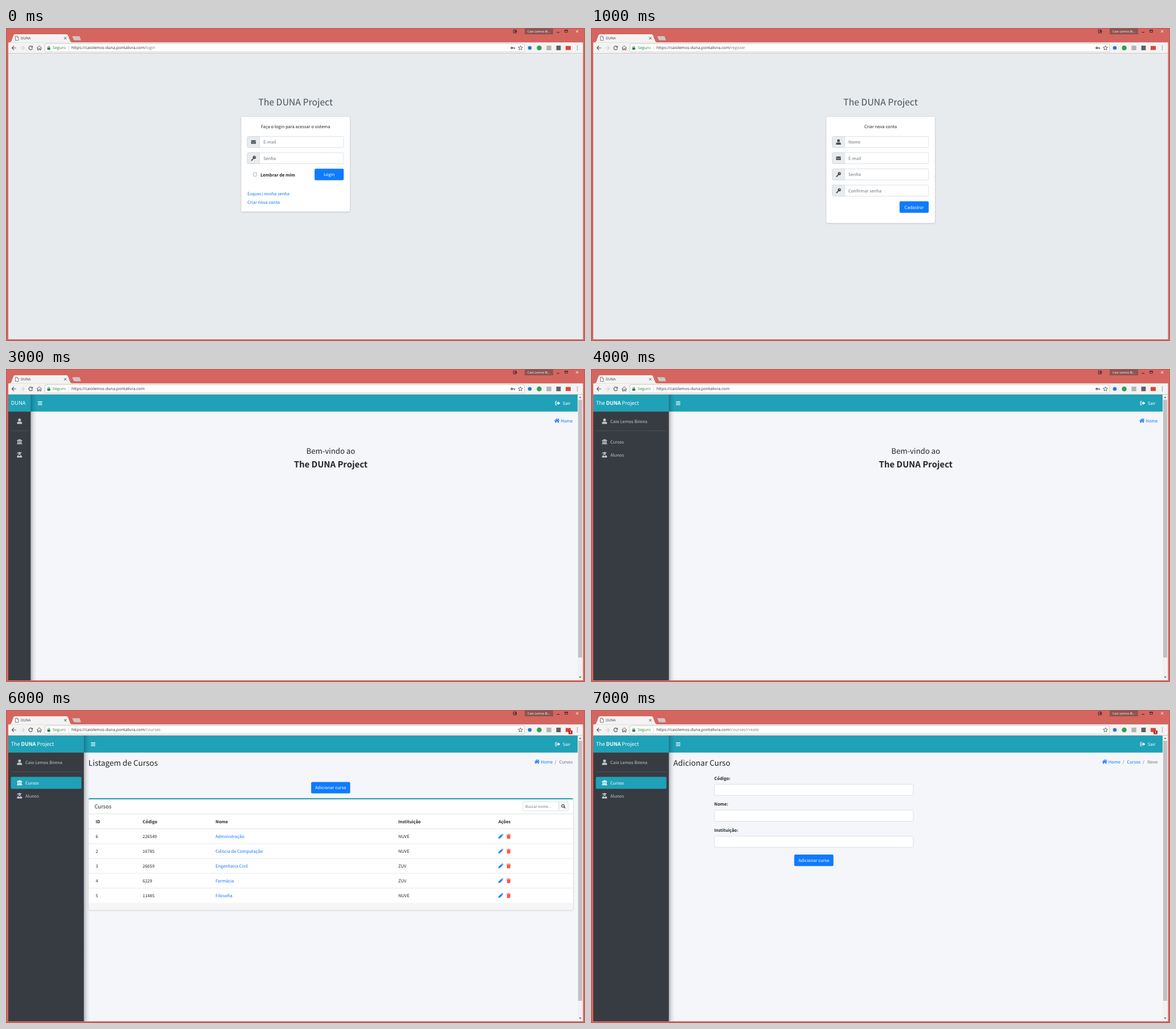
Animation, 1017 px wide and 550 px high, one loop 8000 ms. Source, as an HTML page:

```html
<!DOCTYPE html>
<html lang="pt-BR">
<head>
<meta charset="utf-8">
<title>DUNA</title>
<style>
  html, body { margin: 0; width: 100%; height: 100%; overflow: hidden; }
  svg { display: block; width: 100%; height: 100%; }
  text {
    font-family: "Noto Sans CJK JP", "Noto Sans CJK SC", "Noto Sans CJK KR", "Noto Sans CJK TC", "Noto Sans CJK", sans-serif;
    text-rendering: geometricPrecision;
    white-space: pre;
  }
  .ui text { font-family: "Open Sans", "Noto Sans", sans-serif; }
</style>
</head>
<body>
<svg id="stage" viewBox="0 0 1017 550" xmlns="http://www.w3.org/2000/svg"></svg>
<script>
const TEAL = '#1fa1b7', DARK = '#373c42', BLUE = '#0f7bff', INK = '#212529',
      GREY = '#6c757d', LINE = '#dee2e6', EDGE = '#ced4da', NAV = '#c2c7d0';
const BODY = 7.52;
const HOST = 'https://caiolemos-duna.pontalivra.com';
const USER = 'Caio Lemos Birena';

// Drawing helpers
const rect = (x, y, w, h, fill, more = '') =>
  `<rect x="${x}" y="${y}" width="${w}" height="${h}" fill="${fill}" ${more}/>`;
const path = (d, fill, more = '') => `<path d="${d}" fill="${fill}" ${more}/>`;
const line = (d, color, w = 1) =>
  path(d, 'none', `stroke="${color}" stroke-width="${w}"`);
const circle = (x, y, r, fill, more = '') =>
  `<circle cx="${x}" cy="${y}" r="${r}" fill="${fill}" ${more}/>`;
const at = (x, y, body) => `<g transform="translate(${x} ${y})">${body}</g>`;
const text = (x, y, s, { size = BODY, fill = INK, weight = 400, anchor = 'start' } = {}) =>
  `<text x="${x}" y="${y}" font-size="${size}" fill="${fill}" font-weight="${weight}" text-anchor="${anchor}">${s}</text>`;
const brand = (x, y, size, fill, weight, anchor) =>
  text(x, y, `The <tspan font-weight="${weight}">DUNA</tspan> Project`, { size, fill, weight: 300, anchor });

// Icons, centred on 0,0
const icon = {
  user: c => circle(0, -2.3, 2.5, c) +
    path('M-4.4 4.8V3.4C-4.4 1.6-3.2.7-1.6.7Q0 1.6 1.6.7C3.2.7 4.4 1.6 4.4 3.4V4.8Z', c),
  bank: c => path('M-4.7-2.3 0-4.5 4.7-2.3V-1.3H-4.7Z', c) +
    [-3.4, -.8, 1.8].map(x => rect(x, -.8, 1.6, 3.4, c)).join('') +
    rect(-4, 2.4, 8, .9, c) + rect(-4.7, 3.6, 9.4, 1, c),
  student: c => path('M-4.6-3.6 0-4.9 4.6-3.6 0-2.3Z', c) + line('M-3.9-3.4V-.6', c, .6) +
    path('M-2.4-2.7Q0-1.5 2.4-2.7C2.8 1.2-2.8 1.2-2.4-2.7Z', c) +
    path('M-4.4 4.8V3.2C-4.4 1.7-3.2.9-1.9.8L0 2.7 1.9.8C3.2.9 4.4 1.7 4.4 3.2V4.8Z', c),
  mail: c => rect(-4.2, -3.1, 8.4, 6.3, c, 'rx=".8"') +
    line('M-4.2-1.3 0 1.2 4.2-1.3', '#e9ecef', .7),
  key: c => circle(1.6, -1.5, 2.8, c) + circle(2.3, -2.2, .8, '#e9ecef') +
    path('M.1-.9-4.2 3.2V4.4H-2V3.2H-.8V2L1.5.6Z', c),
  home: c => path('M-4.7.1 0-3.9 4.7.1 4.1.8 0-2.6-4.1.8Z', c) + rect(2.2, -3.6, 1.2, 2.4, c) +
    path('M-3.2.9 0-1.8 3.2.9V3.7H.9V1.3H-.9V3.7H-3.2Z', c),
  exit: c => line('M-1-3H-3.2Q-3.8-3-3.8-2.4V2.4Q-3.8 3-3.2 3H-1', c, 1.1) +
    path('M-2-1H.7V-3.2L4.4 0 .7 3.2V1H-2Z', c),
  bars: c => [-3.1, -.5, 2.1].map(y => rect(-3.8, y, 7.6, 1.2, c)).join(''),
  search: c => circle(-.7, -.7, 2.3, 'none', `stroke="${c}" stroke-width="1.1"`) +
    line('M1 1 3.4 3.4', c, 1.3),
  pencil: c => path('M-4.2 4.2-3.6 1.4 1.1-3.3 3.3-1.1-1.4 3.6Z', c) +
    path('M1.6-3.8 2.3-4.3Q2.8-4.6 3.3-4.1L4.1-3.3Q4.5-2.8 4.2-2.3L3.8-1.6Z', c),
  trash: c => path('M-3.7-3.6H-1.3L-.9-4.2H.9L1.3-3.6H3.7V-2.6H-3.7Z', c) +
    path('M-3.2-2.1H3.2L2.8 3.6Q2.7 4.2 2.2 4.2H-2.2Q-2.7 4.2-2.8 3.6Z', c)
};

// Controls
const button = (x, y, w, label) => rect(x, y, w, 20.2, BLUE, 'rx="2"') +
  text(x + w / 2, y + 13, label, { fill: '#fff', anchor: 'middle' });
const input = (x, y, w, h = 19.5) => rect(x, y, w, h, '#fff', `rx="2" stroke="${EDGE}" stroke-width=".7"`);
const field = (y, glyph, label) => input(424, y, 169) +
  path(`M445.5 ${y}H426Q424 ${y} 424 ${y + 2}V${y + 17.5}Q424 ${y + 19.5} 426 ${y + 19.5}H445.5Z`,
    '#e9ecef', `stroke="${EDGE}" stroke-width=".7"`) +
  at(434.7, y + 9.8, icon[glyph]('#495057')) + text(452, y + 12.6, label, { fill: GREY });

function windowFrame() {
  const dark = '#5a5a5a';
  return rect(0, 0, 1017, 550, '#d5655f') +
    rect(.5, .5, 1016, 549, 'none', 'stroke="#bd5650"') +
    path('M6 25.5C9 25 9.5 23 10.5 20L13 13.2Q13.8 11 16 11H106Q108.2 11 109 13.2L112 21C113 24 114 25.2 116 25.5Z', '#f3f3f3') +
    path('M117 14H128Q129.5 14 130 15.3L132.3 22H121Q119 22 118.4 20.4L116 15Q115.8 14 117 14Z', '#d4c3c2', 'stroke="#a86662" stroke-width=".6"') +
    path('M16.5 14.3H19.6L21.8 16.5V21.7H16.5Z', '#fff', `stroke="${dark}" stroke-width=".8"`) +
    line('M19.4 14.3V16.7H21.8', dark, .6) +
    text(26, 20.2, 'DUNA', { size: 6.1, fill: '#333' }) +
    line('M102 15.8 106.4 20.2M106.4 15.8 102 20.2', '#444', .9) +
    rect(891.3, 3.3, 5, 5.4, 'none', 'rx="1" stroke="#333" stroke-width="1.1"') +
    rect(893.6, 4.7, 3.6, 2.4, '#333') +
    rect(911, .6, 50, 10.6, '#8f5451') +
    text(936, 7.9, 'Caio Lemos Bi...', { size: 5.45, fill: '#fff', anchor: 'middle' }) +
    line('M967.5 7.6H972', '#222', 1) +
    rect(981.7, 4, 4.6, 3.4, 'none', 'stroke="#222" stroke-width=".8"') + rect(981.3, 3.4, 5.4, 1.2, '#222') +
    line('M1001 3.6 1005.4 8M1005.4 3.6 1001 8', '#fff', .9) +
    rect(4, 25.3, 1009.5, 19.4, '#f3f3f3') + line('M4 44.6H1013.5', '#c9c9c9', .7) +
    line('M17.8 35H10.5M14 31.4 10.4 35 14 38.6', dark, 1.2) +
    line('M25 35H32.3M28.8 31.4 32.4 35 28.8 38.6', '#cfcfcf', 1.2) +
    line('M46.1 33A3.3 3.3 0 1 0 46.5 36', dark, 1.2) + path('M47.1 31.2V34.6H43.7Z', dark) +
    line('M54 35.4 58.4 31.2 62.8 35.4M55.5 34.5V38.7H57.3V36.2H59.5V38.7H61.3V34.5', dark, 1) +
    rect(68.4, 27.6, 842, 14.4, '#fff', 'rx="1.4" stroke="#bcbcbc" stroke-width=".7"') +
    rect(72.6, 34.2, 5, 4, '#188038', 'rx=".5"') +
    line('M73.7 34.5V33.2A1.4 1.4 0 0 1 76.5 33.2V34.5', '#188038', .8) +
    text(82, 37.4, 'Seguro', { size: 7.1, fill: '#2c8a3f' }) +
    line('M110 30.5V39.5', '#c8c8c8', .7) +
    path('M903.6 31 904.7 33.7 907.6 33.9 905.4 35.7 906.1 38.5 903.6 37 901.1 38.5 901.8 35.7 899.6 33.9 902.5 33.7Z', 'none', 'stroke="#555" stroke-width=".9"') +
    circle(920, 35, 3.3, '#2a78c8') + circle(936.6, 35, 4.3, '#2fa14f') +
    rect(949.4, 31, 8.4, 8, '#b4b4b4') + rect(966.6, 31, 7.8, 8, '#5d6166') +
    rect(983, 31.6, 9, 7, '#dc4437') +
    [31.8, 35, 38.2].map(y => circle(1003.5, y, .8, dark)).join('');
}

function address(route, saved) {
  const key = circle(888.3, 35, 1.4, 'none', 'stroke="#444" stroke-width="1.2"') +
    line('M889.6 35H894.4M893 35V36.8', '#444', 1.2);
  const badge = rect(988, 36, 7, 6.4, '#c5221f', 'rx=".8"') +
    text(991.5, 41.2, '1', { size: 5.2, fill: '#fff', weight: 700, anchor: 'middle' });
  return `<g class="ui">${text(115, 37.4, `${HOST}<tspan fill="#7b7b7b">${route}</tspan>`, { size: 7.1, fill: '#333' })}${saved ? key : badge}</g>`;
}

function gate(route, bottom, content) {
  return address(route, true) + rect(4, 45, 1009.5, 502, '#e7ebee') +
    brand(508.6, 135.6, 15.8, '#495057', 400, 'middle') +
    rect(413.4, 156, 190.6, bottom - 156, '#fff', 'rx="2" filter="url(#lift)"') + content;
}

const login = gate('/login', 322.4,
  text(508.6, 176.3, 'Faça o login para acessar o sistema', { anchor: 'middle' }) +
  field(190.5, 'mail', 'E-mail') + field(219, 'key', 'Senha') +
  rect(434.4, 254.3, 6.2, 6.2, '#f4f4f4', 'rx=".8" stroke="#a5a5a5" stroke-width=".7"') +
  text(447, 260.8, 'Lembrar de mim', { weight: 700 }) +
  button(542, 247.3, 51.2, 'Login') +
  text(424, 293.8, 'Esqueci minha senha', { fill: BLUE }) +
  text(424, 308.7, 'Criar nova conta', { fill: BLUE }));

const register = gate('/register', 342.6,
  text(508.6, 176.3, 'Criar nova conta', { anchor: 'middle' }) +
  field(190.5, 'user', 'Nome') + field(219, 'mail', 'E-mail') +
  field(247.5, 'key', 'Senha') + field(276, 'key', 'Confirmar senha') +
  button(542, 304.5, 51.2, 'Cadastrar'));

function menuItem(y, glyph, label, wide, active) {
  const color = active ? '#fff' : NAV;
  return (active ? rect(8.5, y - 10.5, 124, 21, TEAL, 'rx="2"') : '') +
    at(23.8, y - .3, icon[glyph](color)) + (wide ? text(34, y + 2.9, label, { fill: color }) : '');
}

function page({ route = '', wide = true, active = '', saved = false, content }) {
  const edge = wide ? 136.8 : 43.4, end = saved ? 507 : 511;
  return address(route, saved) +
    rect(4, 45, 1000, 502, '#f4f6f9') + rect(4, 45, 1000, 29.8, TEAL) +
    rect(edge, 45, 10, 502, 'url(#shade)') +
    rect(4, 74.8, edge - 4, 472.2, DARK) + line(`M4 74.6H${edge}`, '#4b6f78', .6) +
    (wide ? brand(8.7, 63.4, 9.02, '#fff', 700) : text(8.7, 63.4, 'DUNA', { size: 9.4, fill: '#fff' })) +
    menuItem(92, 'user', USER, wide) + line(`M8.5 108.6H${edge - 4.4}`, '#4f5962', .7) +
    menuItem(128, 'bank', 'Cursos', wide, active === 'Cursos') +
    menuItem(150.9, 'student', 'Alunos', wide, active === 'Alunos') +
    at(edge + 16.3, 60, icon.bars('#fff')) + at(969, 60, icon.exit('#fff')) +
    text(991.5, 62.8, 'Sair', { fill: '#fff', anchor: 'end' }) +
    rect(1004, 45, 9.5, 502, '#f1f1f1') + rect(1005, 54, 7, end - 54, '#c1c1c1') +
    path('M1006.4 50.8 1008.6 48.4 1010.8 50.8Z', '#606060') +
    path('M1006.4 540.6 1008.6 543 1010.8 540.6Z', '#606060') + content;
}

function crumbs(x, ...items) {
  return at(x + 4.7, 90.6, icon.home(BLUE)) + text(x + 11.2, 93.8, 'Home', { fill: BLUE }) +
    items.map(([tx, label, fill]) =>
      text(tx - 8, 93.8, '/', { fill: GREY }) + text(tx, 93.8, label, { fill })).join('');
}

const title = s => text(144.8, 97.6, s, { size: 13.55 });

const home = wide => page({
  wide, saved: true,
  content: crumbs(963) +
    text(570.4, 149.4, 'Bem-vindo ao', { size: 13.2, anchor: 'middle' }) +
    text(570.4, 173.2, 'The DUNA Project', { size: 14.9, weight: 700, anchor: 'middle' })
});

function listing(route, name, heads, rows) {
  const cols = [157.5, 240, 368, 689, 865], base = 208.8 + rows.length * 26;
  const cells = (row, y, style) => row.map((s, i) => text(cols[i], y, s, style(i))).join('');
  return page({
    route, active: name,
    content: title(`Listagem de ${name}`) + crumbs(928, [971.7, name, GREY]) +
      button(536, 126.4, 68.5, `Adicionar ${name.slice(0, -1).toLowerCase()}`) +
      rect(145, 155, 851, base - 142.6, '#fff', 'rx="2" filter="url(#lift)"') +
      path('M145 156.9V156.5Q145 155 147 155H994Q996 155 996 156.5V156.9Z', TEAL) +
      rect(145, base, 851, 12.2, '#f6f6f6', 'rx="2"') +
      text(155.4, 173.1, name, { size: 9.4 }) +
      input(908, 161.2, 63, 16) + text(912, 171.6, 'Buscar nome...', { size: 6.6, fill: GREY }) +
      rect(971, 161.2, 16.5, 16, '#f8f9fa', `rx="1.6" stroke="${EDGE}" stroke-width=".7"`) +
      at(979, 169.2, icon.search('#333')) +
      line('M145 182.6H996M145 208.8H996', LINE, 1) +
      cells(heads, 199.1, () => ({ weight: 700 })) +
      rows.map((row, i) => {
        const y = 222 + 26 * i;
        return (i ? line(`M145 ${y - 13}H996`, LINE, .8) : '') +
          cells(row, y + 3, c => ({ fill: c === 2 ? BLUE : INK })) +
          at(869, y, icon.pencil(BLUE)) + at(882.8, y, icon.trash('#ff5a47'));
      }).join('')
  });
}

const students = listing('/students', 'Alunos', ['ID', 'Matrícula', 'Nome', 'Curso', 'Ações'], [
  ['1', '385214', 'Aline Tovar', 'Farmácia'],
  ['4', '372906', 'Bruno Selmo', 'Engenharia Civil'],
  ['2', '391147', 'Carla Nivas', 'Filosofia'],
  ['3', '368520', 'Diego Palmo', 'Administração']
]);

const courses = listing('/courses', 'Cursos', ['ID', 'Código', 'Nome', 'Instituição', 'Ações'], [
  ['6', '226549', 'Administração', 'NUVE'],
  ['2', '16785', 'Ciência da Computação', 'NUVE'],
  ['3', '26659', 'Engenharia Civil', 'ZUV'],
  ['4', '6229', 'Farmácia', 'ZUV'],
  ['5', '11485', 'Filosofia', 'NUVE']
]);

const create = page({
  route: '/courses/create', active: 'Cursos',
  content: title('Adicionar Curso') + crumbs(897.6, [941.5, 'Cursos', BLUE], [977, 'Novo', GREY]) +
    ['Código:', 'Nome:', 'Instituição:'].map((label, i) =>
      text(216.5, 122.8 + 45.6 * i, label, { weight: 700 }) + input(216.8, 130.5 + 45.6 * i, 349.2)).join('') +
    button(357, 254, 68.8, 'Adicionar curso')
});

const STEP = 1000;
const scenes = [login, register, home(true), home(false), home(true), students, courses, create];
const stage = document.getElementById('stage');
stage.innerHTML = `<defs>
  <linearGradient id="shade"><stop stop-color="#000" stop-opacity=".26"/><stop offset=".45" stop-color="#000" stop-opacity=".09"/><stop offset="1" stop-color="#000" stop-opacity="0"/></linearGradient>
  <filter id="lift" x="-5%" y="-5%" width="110%" height="112%"><feDropShadow dx="0" dy=".6" stdDeviation=".8" flood-color="#000" flood-opacity=".28"/></filter>
</defs><g class="ui">${windowFrame()}</g>` +
  scenes.map(s => `<g class="scene" display="none">${s}</g>`).join('');
const layers = [...stage.querySelectorAll('.scene')];

function draw(ms) {
  const now = Math.floor(ms / STEP) % layers.length;
  layers.forEach((g, i) => g.setAttribute('display', i === now ? 'inline' : 'none'));
}

const start = performance.now();
function tick() {
  draw(performance.now() - start);
  requestAnimationFrame(tick);
}
tick();
</script>
</body>
</html>
```
